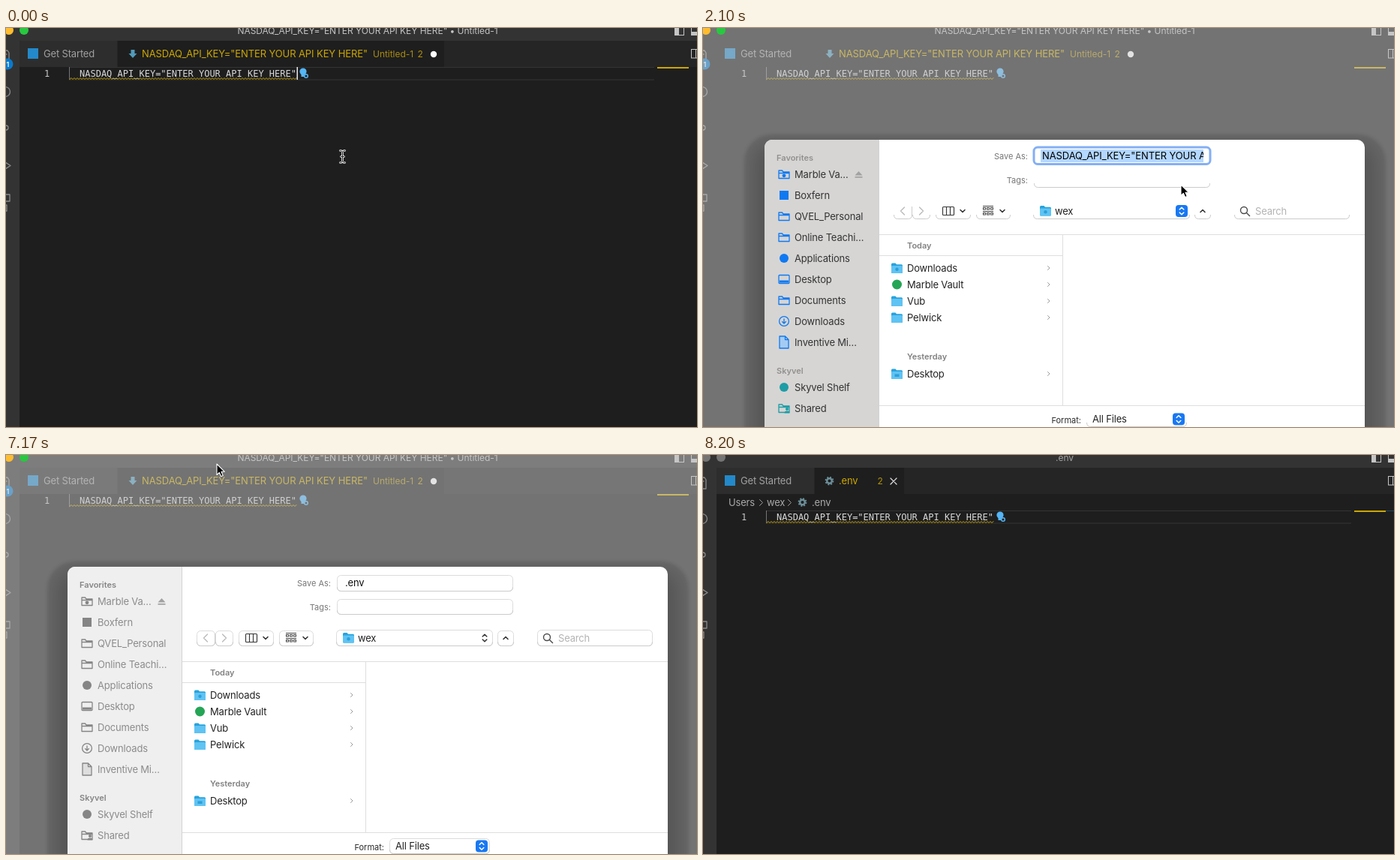
These frames come from a looping animation (921 by 532 pixels, 8.3 s). An HTML page:

```html
<!DOCTYPE html>
<html lang="en">
<head>
<meta charset="utf-8">
<title>Saving an env file</title>
<style>
html, body { margin: 0; width: 100%; height: 100%; overflow: hidden; background: #1e1e1e; }
svg { display: block; }
text { font: 13px Inter, "Liberation Sans", sans-serif; letter-spacing: -.17px; white-space: pre; }
.code { font: 12px "DejaVu Sans Mono", monospace; letter-spacing: 0; }
.title { font-size: 12px; letter-spacing: -.04px; }
.caps { letter-spacing: -.1px; }
.head { font-size: 11px; font-weight: 600; letter-spacing: 0; fill: #818181; }
.label { font-size: 11px; letter-spacing: 0; fill: #777; }
.line { fill: none; stroke-linecap: round; stroke-linejoin: round; }
#side { --bg: #d6d5d4; --ink: #333; --blue: #0f79f2; --teal: #1d9da5; --page: #a6cbf2; --head: #92908f; }
#side.faded { --bg: #e7e6e5; --ink: #8e8e8e; --blue: #8fbef4; --teal: #92cdd1; --page: #cfe1f4; --head: #8b8a89; }
#side.off { --bg: #f0efef; --ink: #8b8b8b; --blue: #858585; --teal: #858585; --page: #dedede; --head: #858585; }
#side text { fill: var(--ink); }
#side .head { fill: var(--head); }
.ico { fill: none; stroke: var(--blue); stroke-width: 1.3; stroke-linejoin: round; }
.ico .solid { fill: var(--blue); stroke: none; }
.teal { --blue: var(--teal) !important; }
</style>
</head>
<body>
<svg id="stage" width="921" height="532" viewBox="0 0 921 532"></svg>
<script>
const LOOP = 8300;
const KEY = 'NASDAQ_API_KEY="ENTER YOUR API KEY HERE"';
const YELLOW = '#cca700';

// Drawing helpers
const text = (x, y, s, fill = '#222', cls = '', more = '') =>
  `<text x="${x}" y="${y}" fill="${fill}" class="${cls}" ${more}>${s}</text>`;
const rect = (x, y, w, h, fill, more = '') =>
  `<rect x="${x}" y="${y}" width="${w}" height="${h}" fill="${fill}" ${more}/>`;
const dot = (x, y, r, fill, more = '') => `<circle cx="${x}" cy="${y}" r="${r}" fill="${fill}" ${more}/>`;
const line = (d, stroke, w = 1, more = '') =>
  `<path class="line" d="${d}" stroke="${stroke}" stroke-width="${w}" ${more}/>`;
const group = (id, body, more = '') => `<g id="${id}" ${more}>${body}</g>`;
const move = (x, y, body, cls = '') => `<g class="${cls}" transform="translate(${x} ${y})">${body}</g>`;
const centre = 'text-anchor="middle"', right = 'text-anchor="end"';

function gear(x, y) {
  return dot(x, y, 3.3, 'none', 'stroke="#6d8f99" stroke-width="2.4"') +
    dot(x, y, 5, 'none', 'stroke="#6d8f99" stroke-width="1.8" stroke-dasharray="2 1.927"');
}

function codeLine(y, id) {
  const wave = 'M85 ' + (y + 16.5) + 'l2 -2l2 2'.repeat(75) + 'l2 -2';
  return group(id, rect(85, y, 779, 1, '#343434') + rect(85, y + 16.5, 779, 1, '#343434')) +
    rect(84, y, 1, 17, '#757575') + line(wave, YELLOW, 1) +
    text(51, y + 13, '1', '#c6c6c6', 'code') + text(98, y + 13, KEY, '#d8d8d8', 'code') +
    dot(396, y + 6, 4.6, '#55b5f5') + rect(393.5, y + 9, 4, 4, '#55b5f5') +
    dot(400, y + 12, 2.3, '#1e1e1e', 'stroke="#55b5f5" stroke-width="1.5"') +
    rect(868, y, 42, 2, YELLOW);
}

const panels =
  rect(0, 0, 921, 532, '#1e1e1e') + rect(0, 0, 921, 17, '#333334') +
  rect(18, 17, 903, 35, '#252526') + rect(18, 17, 130, 35, '#2d2d2d') + rect(0, 17, 18, 515, '#333') +
  rect(149, 17, 435, 35, '#1e1e1e', 'id="wideTab"') + rect(149, 17, 119, 35, '#1e1e1e');

function chrome() {
  const grey = '#8b8b8b';
  return rect(29, 27, 14, 14, '#2489ca') + text(50, 39, 'Get Started', '#a0a0a0') +
    line('M-2 30H2L4 33V45H-2 M-2 35H1', grey, 1.3) +
    dot(-1, 85, 6.5, 'none', `stroke="${grey}" stroke-width="1.3"`) +
    dot(0, 133, 3, 'none', `stroke="${grey}" stroke-width="1.3"`) +
    line('M-1 179L6 183.5L-1 188 M-2 222H5V231H-2 M-2 236H1V244H-2', grey, 1.3) +
    rect(891.5, -3, 12, 12.5, 'none', 'stroke="#c5c5c5"') + rect(892, -3, 5, 12, '#c5c5c5') +
    rect(913.5, -3, 12, 12.5, 'none', 'stroke="#c5c5c5"') + rect(914, 5, 12, 4, '#c5c5c5') +
    rect(913.5, 28.5, 12, 11.5, 'none', 'stroke="#c5c5c5"') + rect(919, 28, 1, 12, '#c5c5c5');
}

const untitled =
  dot(2, 48, 7.5, '#0a7acc') + text(2.5, 51.5, '1', '#fff', 'head', centre + ' style="fill:#fff;font-size:9px"') +
  text(482, 8, KEY + ' • Untitled-1', '#c4c4c4', 'title', centre) +
  '<path d="M166.5 29h5v5h3l-5.5 6l-5.5 -6h3z" fill="#519aba"/>' +
  text(181, 39, KEY, YELLOW, 'caps') + text(489, 39, 'Untitled-1', '#a98c10', 'title') +
  text(548.5, 39, '2', '#b3930c', 'title') + dot(570, 35, 4.2, '#fff') +
  codeLine(52, 'active') + rect(387.5, 52, 1.5, 17, '#e8e8e8', 'id="caret"');

const saved =
  text(482, 8, '.env', '#a5a5a5', 'title', centre) +
  gear(168.5, 34.5) + text(181, 39, '.env', YELLOW) + text(232.5, 39, '2', '#b3930c', 'title') +
  line('M250 31l8 8m0 -8l-8 8', '#e5e5e5', 1.2) +
  text(34, 68, 'Users', '#a9a9a9') + line('M75.5 59.5l4 4l-4 4 M113.5 59.5l4 4l-4 4', '#a0a0a0') +
  text(85, 68, 'wex', '#a9a9a9') + gear(132.5, 63) + text(145, 68, '.env', '#a9a9a9') +
  codeLine(74, 'active2') + rect(910, 74, 11, 1, '#27465a');

// Sidebar icons on a 16 px grid
const FOLDER = '<path d="M1 3h4.5l1.5 2h8v8.5h-14z M1 6.5h14"/>';
const icon = {
  folder: FOLDER,
  drive: FOLDER + '<circle class="solid" cx="8" cy="9.8" r="2.4"/>',
  box: '<rect class="solid" x="2" y="2" width="12" height="12"/>',
  disc: '<circle class="solid" cx="8" cy="8" r="6"/>',
  desk: '<rect x="1" y="2.5" width="14" height="11" rx="1"/><rect class="solid" x="2" y="9.5" width="12" height="3"/>',
  down: '<circle cx="8" cy="8" r="6.4"/><path d="M8 4.5v6.5m-2.7 -2.7l2.7 2.7l2.7 -2.7"/>',
  page: '<path style="fill:var(--page)" d="M2 0h7.500l4.500 4.500v11.500h-12z M9.500 0v4.500h4.500"/>',
  shared: FOLDER + '<circle class="solid" cx="12" cy="9" r="2"/><path class="solid" d="M8.500 14.500a3.500 3 0 0 1 7 0z"/>'
};

function sidebar() {
  const item = (y, kind, name, cls = '') => move(100, y - 8, icon[kind], 'ico ' + cls) + text(122, y + 5, name);
  const top = [
    ['drive', 'Marble Va…'], ['box', 'Boxfern'], ['folder', 'QVEL_Personal'], ['folder', 'Online Teachi…'],
    ['disc', 'Applications'], ['desk', 'Desktop'], ['folder', 'Documents'], ['down', 'Downloads'],
    ['page', 'Inventive Mi…']
  ];
  return '<path d="M92 149H234V560H82V159a10 10 0 0 1 10 -10z" style="fill:var(--bg)"/>' +
    rect(234, 149, 1, 420, '#d3d3d3') +
    text(98, 177, 'Favorites', '', 'head') + top.map((r, i) => item(195 + 28 * i, ...r)).join('') +
    '<path d="M202.500 196.500l5 -5.500l5 5.500z M202.500 198h10v1.800h-10z" fill="#a2a2a2"/>' +
    text(98, 461, 'Skyvel', '', 'head') + item(479, 'disc', 'Skyvel Shelf', 'teal') +
    item(507, 'shared', 'Shared', 'teal') + text(98, 549, 'Locations', '', 'head');
}

function control(x, y, w, h) {
  return rect(x + .5, y + .5, w - 1, h - 1, '#fff', 'class="full" rx="5" stroke="#dcdcdc"') +
    line(`M${x + .5} ${y + h - 5.5}q0 5 5 5h${w - 11}q5 0 5 -5`, '#cbcbcb');
}

const blueFolder = (x, y, mark = '') => move(x, y,
  '<path d="M0 1.500q0 -1.500 1.500 -1.500h4l1.500 1.800h6.500q1.500 0 1.500 1.500v8.700q0 1.500 -1.500 1.500h-12q-1.500 0 -1.500 -1.500z" fill="#27a3dd"/>' +
  rect(0, 3.5, 15, 10, '#5fc3f3', 'rx="1.3"') + mark);
const dotMark = dot(7.5, 8.3, 2.2, '#2c9fd8');
const barMark = rect(4.5, 7, 6, 3.5, '#2c9fd8');
const chevron = (x, y) => line(`M${x - 3} ${y - 1.5}l3 3l3 -3`, '#333', 1.6);

function popup(x, y, id) {
  const arrows = c => line(`M${x - 2.8} ${y - 2}l2.800 -2.800l2.800 2.800 M${x - 2.8} ${y + 2}l2.800 2.800l2.800 -2.800`, c, 1.5);
  return arrows('#333') + group(id, rect(x - 8, y - 8, 16, 16, '#1878f3', 'rx="4"') + arrows('#fff'));
}

function gridIcon(x, y) {
  const row = top => rect(x, top, 14, 1, '#444') +
    [0, 5, 10].map(dx => rect(x + dx + .5, top + 2.5, 3, 2.5, 'none', 'stroke="#444"')).join('');
  return row(y) + row(y + 7);
}

function sheet() {
  const rows = [['Downloads', 320, dotMark], ['Marble Vault', 342, null], ['Vub', 364, ''], ['Pelwick', 386, ''], ['Desktop', 461, barMark]];
  const list = rows.map(([name, y, mark]) =>
    (mark === null ? dot(258.5, y, 6.5, '#25a556') : blueFolder(251, y - 6.5, mark)) +
    text(272, y + 5, name) + line(`M459.5 ${y - 2.5}l2.500 2.500l-2.500 2.500`, '#999')).join('');
  return rect(55, 142, 855, 450, '#000', 'rx="36" opacity=".12" filter="url(#edge)"') +
    rect(70, 157, 824, 430, '#000', 'rx="24" opacity=".14" filter="url(#soft)"') +
    rect(82, 149, 800, 420, '#fff', 'rx="10"') + group('side', sidebar()) +
    text(433, 175, 'Save As:', '', 'label', right) + text(433, 207, 'Tags:', '', 'label', right) +
    control(441, 160, 235, 22) + control(441, 192, 235, 21) +
    rect(441, 159, 235, 22.5, '#fff', 'id="ring" rx="5" stroke="#84aff5" stroke-width="3"') +
    group('picked', rect(450, 162, 217, 17, '#b3d7ff') + text(452, 175, KEY, '#000', 'caps'), 'clip-path="url(#field)"') +
    group('name', '') +
    control(254, 234, 25, 21) + control(279, 234, 24, 21) +
    line('M268.500 239l-5 5l5 5 M288.500 239l5 5l-5 5', '#b9b9b9', 1.3) + rect(278, 238, 1, 12, '#ccc') +
    control(310, 234, 47, 21) + rect(319.5, 238.5, 15, 11, 'none', 'rx="1" stroke="#3a3a3a" stroke-width="1.2"') +
    line('M324.500 239v10 M329.500 239v10', '#3a3a3a', 1.2) + chevron(346, 244) +
    control(364, 234, 46, 21) + gridIcon(373, 237) + chevron(399, 244) +
    control(440, 233, 209, 22) + blueFolder(449, 237, dotMark) + text(469, 248.5, 'wex') + popup(638, 244, 'pathBlue') +
    control(655, 234, 22, 21) + line('M663 245.500l3 -3l3 3', '#333', 1.6) +
    control(708, 233, 154, 22) + dot(721, 243, 4.5, 'none', 'stroke="#4a4a4a" stroke-width="1.4"') +
    line('M724.500 246.500l4 4', '#4a4a4a', 1.5) + text(736, 249, 'Search', '#b3b3b3') +
    rect(235, 275, 647, 1, '#dedede') + rect(479, 276, 1, 228, '#dedede') + rect(235, 303, 244, 1, '#dedede') +
    text(272, 294, 'Today', '', 'head') + text(272, 442, 'Yesterday', '', 'head') + list +
    rect(235, 503, 647, 1, '#dedede') +
    group('format', text(504, 527, 'Format:', '', 'label', right + ' style="fill:#2a2a2a"') +
      control(511, 511, 134, 21) + text(519, 526, 'All Files') + popup(634, 521.5, 'formatBlue')) +
    rect(235, 536, 647, 1, '#dedede');
}

const alertBox =
  rect(76, -30, 286, 92, '#000', 'rx="20" opacity=".36" filter="url(#soft)"') +
  rect(88, -40, 260, 77, '#ededed', 'rx="10"') +
  rect(104, -8, 110, 29, '#fff', 'rx="6" stroke="#d2d2d2" stroke-width=".7"') + text(159, 11, 'Cancel', '#222', '', centre) +
  rect(222, -8, 110, 29, '#147cf6', 'rx="6"') + text(277, 11, 'Use “.”', '#fff', '', centre);

const arrow = '<path d="M0 0V14.500L3.300 11.300L5.600 16.500L8.200 15.400L6 10.300H10.400Z" fill="#000" stroke="#fff" stroke-width="1.1" stroke-linejoin="round"/>';
const beamPath = 'M445.500 163.500q3 0 3 2.500v11q0 2.500 -3 2.500 M451.500 163.500q-3 0 -3 2.500 M448.500 177q0 2.500 3 2.500 M446.500 171.500h4';

const stage = document.getElementById('stage');
stage.innerHTML =
  `<defs><filter id="soft" x="-20%" y="-60%" width="140%" height="220%"><feGaussianBlur stdDeviation="9"/></filter>
   <filter id="edge"><feGaussianBlur stdDeviation="2.5"/></filter>
   <clipPath id="field"><rect x="444" y="160" width="223" height="21"/></clipPath></defs>` +
  panels + rect(0, 0, 921, 532, '#1e1e1e', 'id="flat"') + chrome() +
  group('untitled', untitled) + group('saved', saved) +
  rect(0, 0, 921, 532, '#c8c8c8', 'id="dim"') +
  dot(4, 3, 6, '#febc2e', 'id="yellow"') + dot(24, 3, 6, '#28c840', 'id="green"') +
  group('sheet', sheet()) + group('alert', alertBox) +
  group('beam', line(beamPath, '#fff', 2.6) + line(beamPath, '#222', 1)) + group('arrow', arrow);

const $ = id => document.getElementById(id);
const show = (id, on) => { $(id).style.display = on ? '' : 'none'; };
const at = (t, rows) => rows.filter(r => r[0] <= t).pop()[1];

const PRESENCE = [[0, 0], [150, .35], [300, .8], [450, 1], [7320, .44], [7470, .1], [7620, 0]];
const ALERT = [[0, 0], [5090, .5], [5240, 1], [7020, .45], [7170, 0]];
const TYPED = [[0, ''], [2850, '.'], [3150, '.e'], [3300, '.en'], [3740, '.env']];
const SIDE = [[0, ''], [5090, 'faded'], [7020, 'off']];
// Pointer travel: start, steps, from, to
const TRAVEL = [
  [0, 1, [448, 170], [448, 170]],
  [1200, 7, [448, 170], [637, 209]],
  [4040, 4, [637, 209], [870, 548]],
  [5540, 1, [454, 213], [454, 213]],
  [5690, 4, [454, 213], [281, 12]],
  [7320, 1, [697, 389], [697, 389]],
  [7470, 3, [697, 389], [900, 548]]
];
const STEP = 147;

function pointer(t) {
  const [start, steps, a, b] = TRAVEL.filter(r => r[0] <= t).pop();
  const p = Math.min(1, (Math.floor((t - start) / STEP) + 1) / steps);
  const e = p * p * (3 - 2 * p);
  return a.map((v, i) => v + (b[i] - v) * e);
}

function draw(t) {
  const open = at(t, PRESENCE), typed = at(t, TYPED), done = t >= 8200;
  const focused = t < 5090, closing = t >= 7320;
  show('untitled', !done);
  show('wideTab', !done);
  show('saved', done);
  show('flat', t >= 450 && t < 7020);
  $('yellow').setAttribute('fill', done ? '#747474' : '#febc2e');
  $('green').setAttribute('fill', done ? '#747474' : '#28c840');
  show('active', open < 1);
  show('caret', open < 1);
  $('dim').setAttribute('opacity', open * .5);
  $('sheet').setAttribute('opacity', open);
  $('sheet').setAttribute('transform', `translate(0 ${-34 * (1 - open)})`);
  $('side').setAttribute('class', at(t, SIDE));
  show('ring', focused);
  show('picked', !typed);
  const caretX = 452 + [0, 4, 11, 18, 25][typed.length];
  const caret = typed && t < 4790 ? rect(caretX, 162, 1.2, 17, '#000') : '';
  $('name').innerHTML = text(452, 175, typed, '#111') + caret;
  show('pathBlue', focused);
  show('formatBlue', focused || t >= 7020);
  show('format', !closing);
  stage.querySelectorAll('.full').forEach(el => el.setAttribute('stroke-opacity', t >= 7020 ? 1 : 0));
  $('alert').setAttribute('opacity', at(t, ALERT));
  show('beam', t < 150);
  show('arrow', t >= 150 && !done);
  $('arrow').setAttribute('transform', `translate(${pointer(t)})`);
}

const began = performance.now();
function frame() {
  draw((performance.now() - began) % LOOP);
  requestAnimationFrame(frame);
}
draw(0);
requestAnimationFrame(frame);
</script>
</body>
</html>
```
